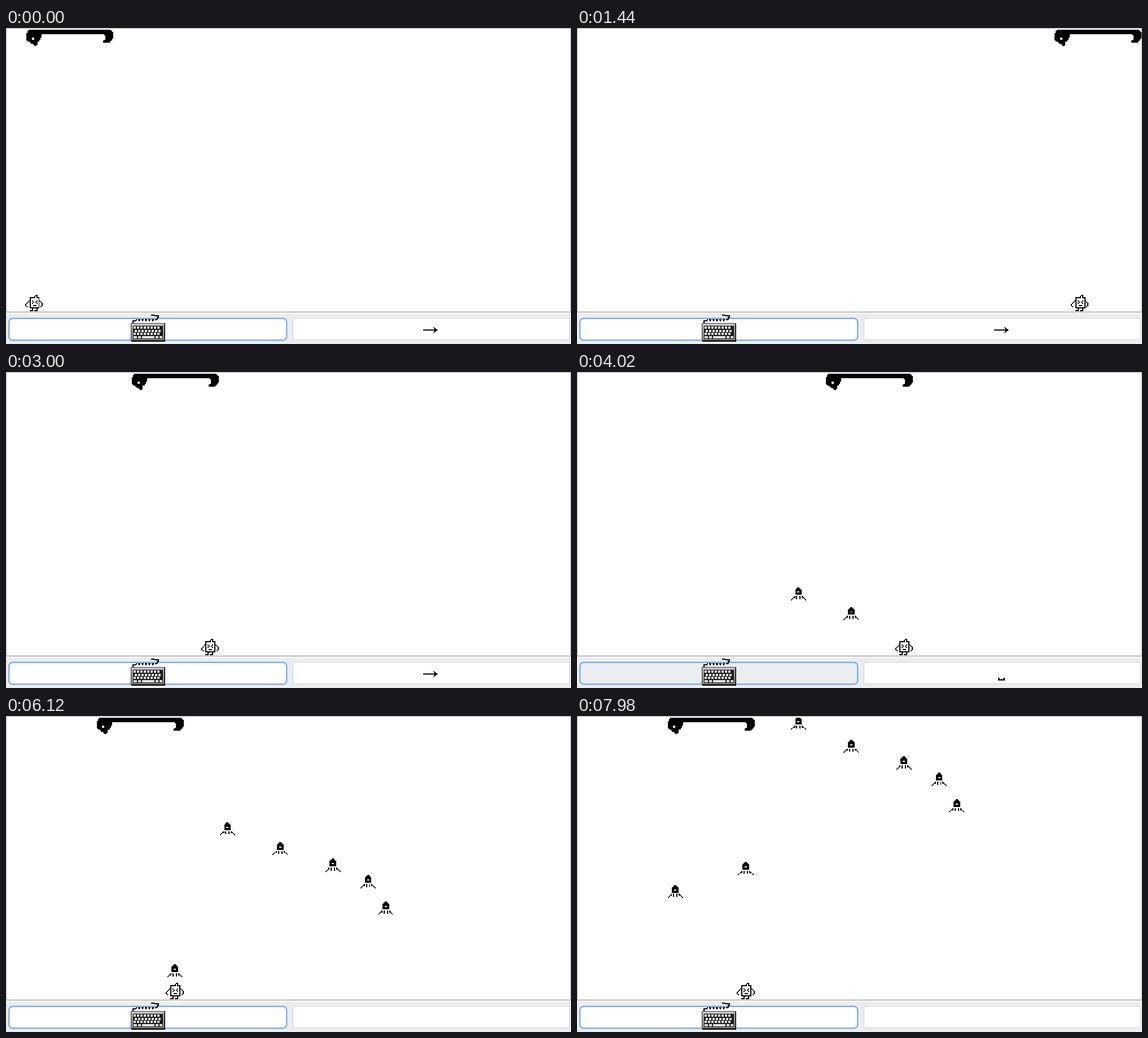
Animation, 1001 px wide and 559 px high, one loop 8000 ms. Source, as an HTML page:

```html
<!DOCTYPE html>
<html lang="en">
<head>
<meta charset="utf-8">
<title>Keyboard shooter</title>
<style>
  html, body { margin: 0; width: 100%; height: 100%; overflow: hidden; background: #fff; }
  svg { display: block; width: 1001px; height: 559px; }
  .pix { shape-rendering: crispEdges; }
</style>
</head>
<body>
<svg viewBox="0 0 1001 559" xmlns="http://www.w3.org/2000/svg">
  <defs>
    <clipPath id="field"><rect x="3" y="3" width="997" height="499"/></clipPath>
    <linearGradient id="case" x1="0" y1="0" x2="0" y2="1">
      <stop offset="0" stop-color="#b4b4b4"/><stop offset="1" stop-color="#878787"/>
    </linearGradient>
  </defs>

  <rect width="1001" height="559" fill="#fff"/>
  <g clip-path="url(#field)" class="pix">
    <g id="shots"></g>
    <path id="boss" fill-rule="evenodd" d="M3 0H78V1H79V2H80V8H79V10H78V11H77V12H71V10H72V9H73V5H72V4H15V7H14V9H13V11H11V14H10V15H8V14H7V13H5V12H4V11H2V10H1V3H2V1H3Z M6 7H8V9H6Z"/>
    <path id="hero"/>
  </g>

  <rect y="502" width="1001" height="57" fill="#ebedef"/>
  <rect x=".5" y=".5" width="1000" height="502" fill="none" stroke="#adadad"/>
  <path d="M0 502.5H1001" stroke="#a4a4a4" stroke-width="1.6"/>
  <path d="M0 504.5H1001" stroke="#fafafa" stroke-width="2"/>

  <rect id="button" x="5.2" y="513.7" width="492" height="38.6" rx="6.5" stroke="#7fb0e6" stroke-width="2.5"/>
  <rect x="508.5" y="513.5" width="490" height="38" fill="#fff" stroke="#d2d4d6"/>
  <g id="keyboard" class="pix"></g>

  <g id="arrow">
    <path d="M739 534.3H762" stroke="#000" stroke-width="2"/>
    <path d="M765 534.3L756.5 528.2Q758.5 532 759.5 534.3Q758.5 536.6 756.5 540.4Z"/>
  </g>
  <path id="space" d="M747.2 540.8V544.6H756.8V540.8" fill="none" stroke="#000" stroke-width="2.4"/>
</svg>

<script>
const LOOP = 8000, FRAME = 60, STEP_MS = 53, PRESS_MS = 130;
const TILE = 31.15, UNIT = TILE / 16, ORIGIN = 3;
const $ = id => document.getElementById(id);

const heroArt = `
................
.........##.....
........#.#.....
....#####.###...
....#.......#...
....#.......#...
...##.#...#.##..
..#.#..#.#..#.#.
.#..#.#...#.#..#
#...#.......#..#
#...#..###..#..#
.#..#.......#.#.
....#########...
......#...#.....
......#...#.....
....###.###.....`;

const shotArt = `
.......##.......
......####......
.....######.....
.....######.....
.....##..##.....
.....######.....
.....######.....
................
....#.#..#.#....
...##.#..#.##...
..#...#..#...#..
.#............#.`;

// Key holds: start time, column before, column after
const moves = [
  [0, 0, 30], [1680, 30, 9], [2940, 9, 11], [3480, 11, 14], [3840, 14, 17],
  [4240, 17, 19], [4760, 19, 20], [5220, 20, 8], [6180, 8, 4], [7380, 4, 8]
];
// Space released: time, column
const shots = [[3420, 11], [3780, 14], [4140, 17], [4500, 19], [4980, 20], [6120, 8], [6540, 4]];
const hitches = [4080, 4440];

function artPath(art) {
  let d = "";
  art.trim().split("\n").forEach((row, y) => {
    for (const run of row.matchAll(/#+/g)) d += `M${run.index} ${y}h${run[0].length}v1h-${run[0].length}z`;
  });
  return d;
}

function make(tag, parent, attrs) {
  const node = document.createElementNS("http://www.w3.org/2000/svg", tag);
  for (const name in attrs) node.setAttribute(name, attrs[name]);
  return parent.appendChild(node);
}

function place(node, x, y) {
  node.setAttribute("transform", `translate(${x} ${y}) scale(${UNIT})`);
}

function show(node, visible) {
  node.setAttribute("visibility", visible ? "visible" : "hidden");
}

function buildKeyboard() {
  const board = $("keyboard");
  const box = (x, y, width, height, fill) => make("rect", board, { x, y, width, height, fill });
  make("path", board, {
    d: "M225 522V518H229M230 516H268M268 516V512H270V509H263M263 508H257",
    fill: "none", stroke: "#000", "stroke-width": 2
  });
  for (let x = 232; x < 266; x += 6) {
    box(x, 515, 2, 2, "#fff");
    box(x - 3, 517, 2, 2, "#000");
  }
  box(222, 522, 60, 33, "#111");
  box(221, 522, 60, 31, "#333");
  box(222, 523, 58, 29, "url(#case)");
  box(222, 523, 58, 2, "#d2d2d2");
  box(225, 527, 53, 23, "#1c1c1c");
  for (let row = 0; row < 3; row++) {
    for (let x = 226 + row % 2 * 2; x < 274; x += 6) box(x, 528 + row * 5.5, 4, 4, "#e6e6e6");
  }
  box(226, 545, 6, 4, "#ddd");
  box(234, 545, 5, 4, "#ddd");
  box(241, 545, 22, 4, "#e6e6e6");
  box(265, 545, 5, 4, "#ddd");
  box(272, 545, 5, 4, "#ddd");
}

function ticks(t) {
  return Math.floor((t - shots[0][0]) / FRAME) - hitches.filter(h => t >= h).length;
}

function draw(t) {
  let column = 0, bossColumn = 0, held = 0;
  for (const [start, from, to] of moves) {
    if (t < start) break;
    const dir = Math.sign(to - from), total = Math.abs(to - from);
    const done = Math.min(total, Math.floor((t - start) / STEP_MS));
    column = from + dir * done;
    bossColumn = Math.min(26, Math.max(0, start ? column - 4 : column));
    held = t < start + total * STEP_MS + 20 ? dir : 0;
  }
  place($("hero"), ORIGIN + TILE * (column + 1), ORIGIN + TILE * 15);
  place($("boss"), ORIGIN + TILE * (bossColumn + 1), ORIGIN);

  let pressed = false;
  shots.forEach(([time, col], i) => {
    pressed ||= t >= time - PRESS_MS && t < time;
    const node = shotNodes[i];
    show(node, t >= time);
    let row = 14 * 16 - 3 * (ticks(t) - ticks(time));
    if (row < 3) row = -1;
    place(node, ORIGIN + TILE * (col + 1), ORIGIN + row * UNIT);
  });

  $("button").setAttribute("fill", pressed ? "#ebedef" : "#fff");
  show($("space"), pressed);
  show($("arrow"), held && !pressed);
  $("arrow").setAttribute("transform", held < 0 ? "translate(1504 0) scale(-1 1)" : "");
}

buildKeyboard();
$("hero").setAttribute("d", artPath(heroArt));
const shotNodes = shots.map(() => make("path", $("shots"), { d: artPath(shotArt) }));

const begin = performance.now();
function loop() {
  const t = (performance.now() - begin) % LOOP;
  draw(Math.floor((t + 2) / FRAME) * FRAME);
  requestAnimationFrame(loop);
}
draw(0);
requestAnimationFrame(loop);
</script>
</body>
</html>
```
